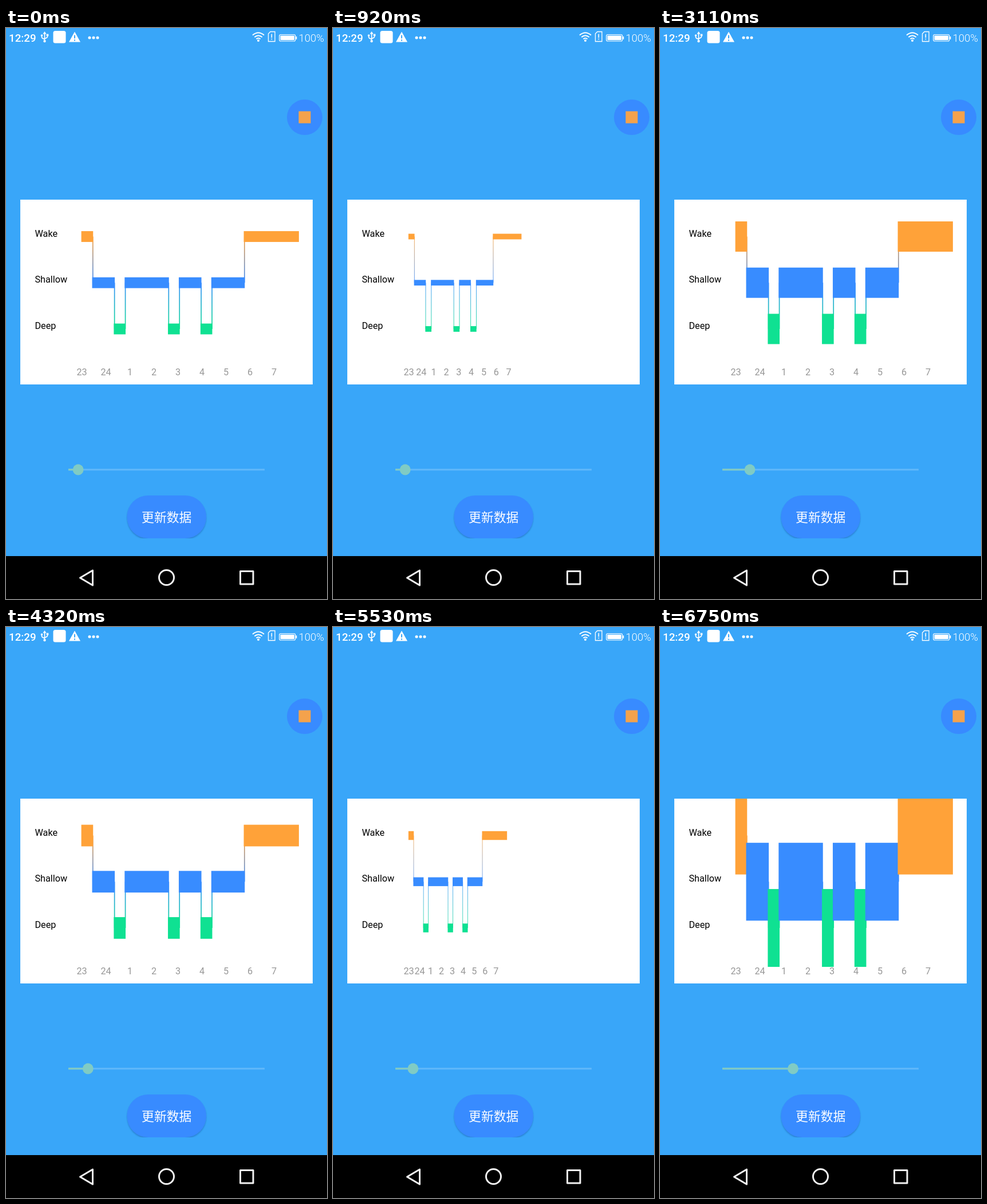
An HTML page that plays this animation: 561 by 998 pixels, repeating every 8 s.

```html
<!DOCTYPE html>
<html lang="zh">
<head>
<meta charset="utf-8">
<title>Sleep chart</title>
<style>
html, body { margin: 0; width: 100%; height: 100%; overflow: hidden; background: #39a6f9; }
svg { display: block; width: 100%; height: 100%; }
text { font-family: Roboto, "Noto Sans", sans-serif; }
.label { font-size: 16.2px; }
.hour { font-size: 16.2px; fill-opacity: .41; text-anchor: middle; }
.button { font: 500 21.8px "Noto Sans CJK SC", "Noto Sans CJK", sans-serif; fill: #fff; text-anchor: middle; }
</style>
</head>
<body>
<svg viewBox="0 0 561 998">
  <defs>
    <linearGradient id="wakeLine" gradientUnits="userSpaceOnUse" x1="0" y1="364.5" x2="0" y2="445.2">
      <stop stop-color="#ffa239"/><stop offset="1" stop-color="#388cff"/>
    </linearGradient>
    <linearGradient id="deepLine" gradientUnits="userSpaceOnUse" x1="0" y1="445.2" x2="0" y2="526">
      <stop stop-color="#388cff"/><stop offset="1" stop-color="#0fe192"/>
    </linearGradient>
    <clipPath id="card"><rect x="25" y="300" width="511" height="323"/></clipPath>
    <clipPath id="pill"><rect x="200" y="810" width="161" height="82"/></clipPath>
    <filter id="soft" x="-10%" y="-10%" width="120%" height="120%"><feGaussianBlur stdDeviation="1.3"/></filter>
  </defs>
  <rect width="561" height="998" fill="#39a6f9"/>

  <!-- status bar -->
  <g fill="#fff">
    <text x="5" y="24" font-size="18.8" font-weight="500">12:29</text>
    <g fill="none" stroke="#fff" stroke-width="1.7">
      <path d="M67.500 9V22M62.500 13.500V16Q62.500 18 67.500 19.500M72.500 12V15Q72.500 17 67.500 18.500"/>
    </g>
    <path d="M67.500 6l3 4.500h-6z"/>
    <circle cx="67.500" cy="23" r="2.200"/>
    <circle cx="62.500" cy="13" r="1.800"/>
    <rect x="70.700" y="10.500" width="3.600" height="3.600"/>
    <rect x="82.500" y="5" width="22" height="21.500" rx="3.500"/>
    <path d="M120 6.500L130 24.500H110Z"/>
    <path d="M120 12.500V18.300M120 20.300V22.500" stroke="#39a6f9" stroke-width="2"/>
    <circle cx="146" cy="17" r="2.500"/><circle cx="153" cy="17" r="2.500"/><circle cx="160" cy="17" r="2.500"/>
    <g fill="none" stroke="#fff" stroke-width="1.900">
      <path d="M431 12.500Q441 4 451 12.500M434.300 16Q441 10.300 447.700 16M437.400 19.300Q441 16.300 444.600 19.300"/>
    </g>
    <circle cx="441" cy="22" r="2"/>
    <path d="M462 6.500H470V23.500H458.500V10Z" fill="none" stroke="#fff" stroke-width="1.300"/>
    <path d="M464.300 10.500V17M464.300 18.500V20.300" stroke="#fff" stroke-width="1.600"/>
    <rect x="477.700" y="11.500" width="28" height="11.500" rx="2.500" fill="none" stroke="#fff" stroke-width="1.200"/>
    <rect x="479.500" y="13.300" width="24.400" height="7.900" rx="1"/>
    <rect x="506.300" y="14.800" width="2" height="5"/>
    <text x="511.500" y="24" font-size="18.500" font-weight="300">100%</text>
  </g>

  <circle cx="522" cy="156" r="31" fill="#388bff"/>
  <rect x="511.500" y="145.500" width="21" height="21" fill="#f4a24c"/>

  <!-- chart -->
  <rect x="25" y="300" width="511" height="323" fill="#fff"/>
  <g id="chart" clip-path="url(#card)"></g>
  <text class="label" x="50.500" y="364.500">Wake</text>
  <text class="label" x="50.500" y="445">Shallow</text>
  <text class="label" x="50.500" y="526">Deep</text>

  <!-- slider -->
  <rect x="109" y="770.400" width="343" height="3" fill="#61b8fa"/>
  <rect id="fill" x="109" y="770.400" height="3" fill="#83cbc0"/>
  <circle id="thumb" cy="772" r="9.400" fill="#80cbc4"/>

  <!-- button -->
  <g clip-path="url(#pill)">
    <rect x="211.500" y="819" width="138.500" height="75" rx="37" fill="#1c5fae" opacity=".5" filter="url(#soft)"/>
    <rect x="211.500" y="817" width="138.500" height="75" rx="37" fill="#388bff"/>
  </g>
  <text class="button" x="280.700" y="863">更新数据</text>

  <!-- navigation bar -->
  <rect y="923" width="561" height="75"/>
  <g fill="none" stroke="#f2f2f2" stroke-width="3" stroke-linejoin="round">
    <path d="M129.500 961L151.500 948V974Z"/>
    <circle cx="280.500" cy="960.500" r="13"/>
    <rect x="409.500" y="949.500" width="22.500" height="22.500"/>
  </g>
</svg>
<script>
const LOOP = 8000, LEFT = 132, UNIT = 18.93, HOUR = 42, LINE = 1.7;
const levels = [
  { y: 364.5, color: '#ffa239' },
  { y: 445.2, color: '#388cff' },
  { y: 526, color: '#0fe192' }
];
// [level, length in units]
const phases = [[0, 1], [1, 2], [2, 1], [1, 4], [2, 1], [1, 2], [2, 1], [1, 3], [0, 5]];
const hours = [23, 24, 1, 2, 3, 4, 5, 6, 7];

// Slider values of each drag, one per step
const drags = [
  { start: 3110, gap: 70, values: [14, 13, 11, 9, 8, 7, 6] },
  { start: 3960, gap: 70, values: [14, 13, 12, 11, 10, 10, 9] },
  { start: 6380, gap: 61.7, values: [12, 17, 22, 27, 31, 34, 36] }
];
const refreshes = [
  { start: 500, delay: 100, until: 3110 },
  { start: 5110, delay: 122, until: 6380 }
];

const byId = id => document.getElementById(id);
const chart = byId('chart');

function add(tag, attrs) {
  const node = document.createElementNS('http://www.w3.org/2000/svg', tag);
  set(node, attrs);
  chart.append(node);
  return node;
}

function set(node, attrs) {
  for (const key in attrs) node.setAttribute(key, attrs[key]);
}

const links = phases.slice(1).map(([level], i) => {
  const deep = Math.max(level, phases[i][0]) === 2;
  const top = levels[deep ? 1 : 0].y;
  return add('rect', {
    y: top, height: levels[deep ? 2 : 1].y - top,
    fill: `url(#${deep ? 'deepLine' : 'wakeLine'})`
  });
});
const bars = phases.map(([level]) => add('rect', { fill: levels[level].color }));
const marks = hours.map(hour => {
  const node = add('text', { class: 'hour', y: 607 });
  node.textContent = hour;
  return node;
});

const stepAt = (t, start, gap) => Math.floor((t - start + 4) / gap);

function sliderAt(t) {
  let value = 5;
  for (const { start, gap, values } of drags) {
    if (t >= start) value = values[Math.min(stepAt(t, start, gap), values.length - 1)];
  }
  return value;
}

function growthAt(t) {
  const run = refreshes.find(r => t >= r.start && t < r.until);
  if (!run) return 1;
  const step = Math.min(stepAt(t, run.start, 61), 10);
  const u = (step * 61 - run.delay) / 519;
  return u < 0 ? 1 : 0.5 - Math.cos(Math.PI * Math.min(u, 1)) / 2;
}

function draw(t) {
  const value = sliderAt(t), grow = growthAt(t);
  const thick = value * 3.78 * grow;
  let units = 0;
  phases.forEach(([level, length], i) => {
    const x = LEFT + units * UNIT * grow;
    if (i) set(links[i - 1], { x, width: Math.max(LINE * grow, 0.3) });
    set(bars[i], {
      x: x - 0.4 * grow,
      width: (length * UNIT + LINE) * grow,
      y: levels[level].y - thick / 2,
      height: thick
    });
    units += length;
  });
  marks.forEach((node, i) => set(node, { x: LEFT + 0.5 + i * HOUR * grow }));
  set(byId('fill'), { width: value * 3.43 });
  set(byId('thumb'), { cx: 109 + value * 3.43 });
}

const begin = performance.now();
function tick() {
  draw((performance.now() - begin) % LOOP);
  requestAnimationFrame(tick);
}
draw(0);
requestAnimationFrame(tick);
</script>
</body>
</html>
```
